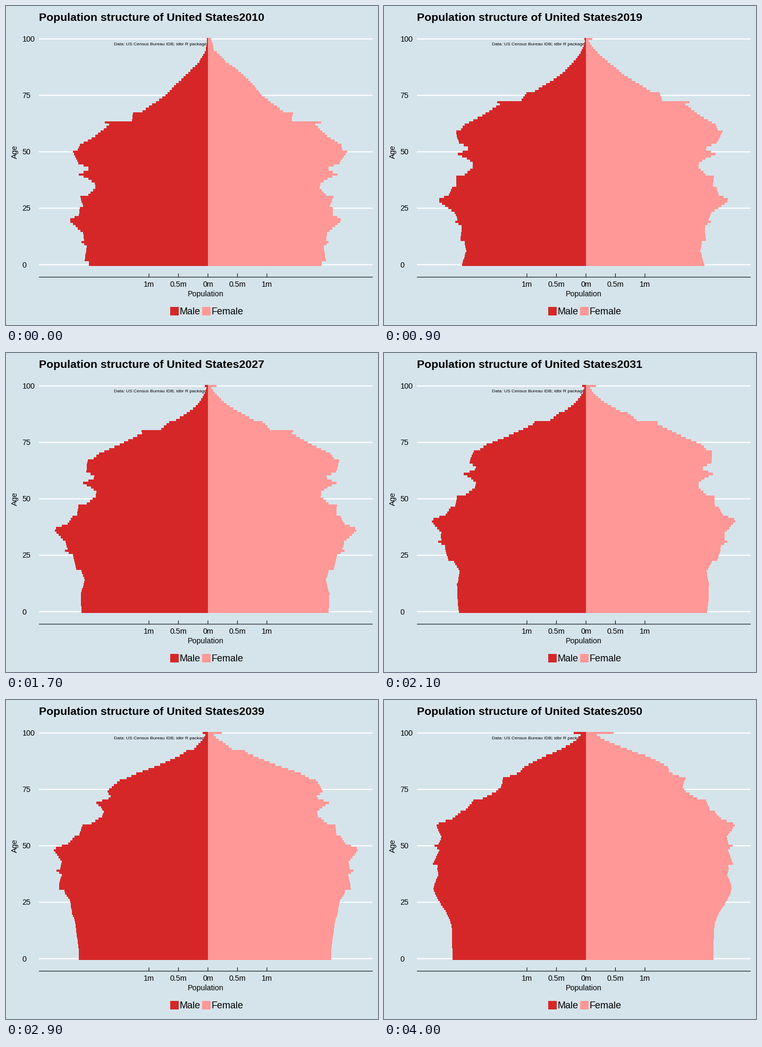
A matplotlib script that plays this animation: 700x600 px, repeating every 4100 ms.

```python
import numpy as np
import matplotlib.pyplot as plt
from matplotlib.animation import FuncAnimation
from matplotlib.patches import Rectangle

plt.rcParams["font.family"] = "Liberation Sans"

W, H, DPI = 700, 600, 100
FIRST, LAST = 2010, 2050
MID, BASE_Y, STEP = 380, 486.5, 4.245    # zero population, age 0, pixels per year
MILLION = 111
BG, RED, PINK = "#d5e4eb", "#d62728", "#ff9896"
AGES = np.arange(101)

# Turning points of the first male outline: age, bar length.
OUTLINE = [
    (1, 224), (2, 232), (8, 228), (10, 238), (11, 233), (14, 235),
    (19, 259), (20, 259), (22, 243), (25, 241), (26, 235), (30, 240),
    (31, 225), (34, 212), (36, 213), (38, 225), (40, 243), (42, 225),
    (43, 225), (45, 244), (50, 254), (51, 245), (53, 241), (57, 212),
    (62, 186), (63, 194), (64, 143), (67, 141), (68, 123), (75, 80),
    (79, 64), (85, 37), (90, 16), (95, 4), (100, 1.5)]
BIRTHS = [(2010, 224), (2013, 222.5), (2019, 233), (2027, 238),
          (2035, 240), (2050, 251)]

# Death rate at age 82.5 and its growth per year of age.
MORTALITY = {"male": (0.074, 0.098), "female": (0.0525, 0.112)}


def along(points, x):
    return np.interp(x, *zip(*points))


def share(sex, age):
    """Size of a sex at an age, relative to men."""
    if sex == "male":
        return np.ones_like(age, dtype=float)
    return np.maximum(0.955, 0.93 + 0.0017 * age + np.exp((age - 90) / 9.5))


def growth(sex, year):
    """Yearly factor for each age: migration less deaths."""
    age = AGES + 0.5
    level, slope = MORTALITY[sex]
    deaths = (level * np.exp(slope * (age - 82.5))
              * np.exp(-0.0075 * (year - FIRST)))
    arrivals = (0.0035 * np.maximum(0, 1 - age / 70)
                + 0.01 * np.exp(-((age - 24) / 8) ** 2))
    if year < 2019:
        arrivals *= 0.65
    return np.exp(arrivals - deaths)


def project(sex):
    """Bar lengths by age for every year, each cohort one age older."""
    people = along(OUTLINE, AGES) * share(sex, AGES)
    years = [people]
    for year in range(FIRST, LAST):
        grown = people * growth(sex, year)
        people = np.roll(grown, 1)
        people[0] = along(BIRTHS, year + 1) * share(sex, 0)
        people[-1] += grown[-1]          # 100 and over stay together
        years.append(people)
    return np.round(years)


LENGTHS = {sex: project(sex) for sex in MORTALITY}


def px(size):
    return size * 72 / DPI


def label(x, y, text, size=14.4, **kw):
    kw.setdefault("va", "baseline")
    return ax.text(x, y, text, fontsize=px(size), color="black", **kw)


def line(xs, ys, color, width):
    ax.plot(xs, ys, color=color, lw=px(width), solid_capstyle="butt",
            snap=False, zorder=1)


fig = plt.figure(figsize=(W / DPI, H / DPI), dpi=DPI, facecolor=BG)
ax = fig.add_axes([0, 0, 1, 1])
ax.set_xlim(0, W)
ax.set_ylim(H, 0)
ax.axis("off")

for age in range(0, 101, 25):
    y = BASE_Y - STEP * age
    line([62, 690], [y, y], "white", 2.1)
    label(30.5, y + 5, str(age))

line([62, 690], [510, 510], "black", 1.07)
for value in (-1, -0.5, 0, 0.5, 1):
    x = MID + MILLION * value
    line([x, x], [503, 510], "black", 1.07)
    label(x, 528, f"{abs(value):g}m", ha="center")

label(375.5, 546, "Population", 14.2, ha="center")
label(20.5, 274.5, "Age", ha="center", rotation=90, rotation_mode="anchor")
label(378, 73.5, "Data: US Census Bureau IDB; idbr R package", 8.5,
      ha="right", zorder=2)
title = label(62, 28, "", 21.3, weight="bold")

for x, color, name in ((309, RED, "Male"), (369, PINK, "Female")):
    ax.add_patch(Rectangle((x, 566), 16, 16, color=color, lw=0))
    label(x + 18, 580, name, 18)

edges = BASE_Y - STEP * (np.arange(102) - 0.5)
sides = {}
for sex, color in (("male", RED), ("female", PINK)):
    sides[sex] = ax.stairs(np.full(101, MID), edges, baseline=MID, fill=True,
                           orientation="horizontal", color=color, lw=0,
                           antialiased=False, zorder=3)


def draw(i):
    title.set_text(f"Population structure of United States{FIRST + i}")
    sides["male"].set_data(values=MID - LENGTHS["male"][i])
    sides["female"].set_data(values=MID + LENGTHS["female"][i])
    return [title, *sides.values()]


anim = FuncAnimation(fig, draw, frames=LAST - FIRST + 1, interval=100,
                     repeat=True, repeat_delay=0)
plt.show()
```
